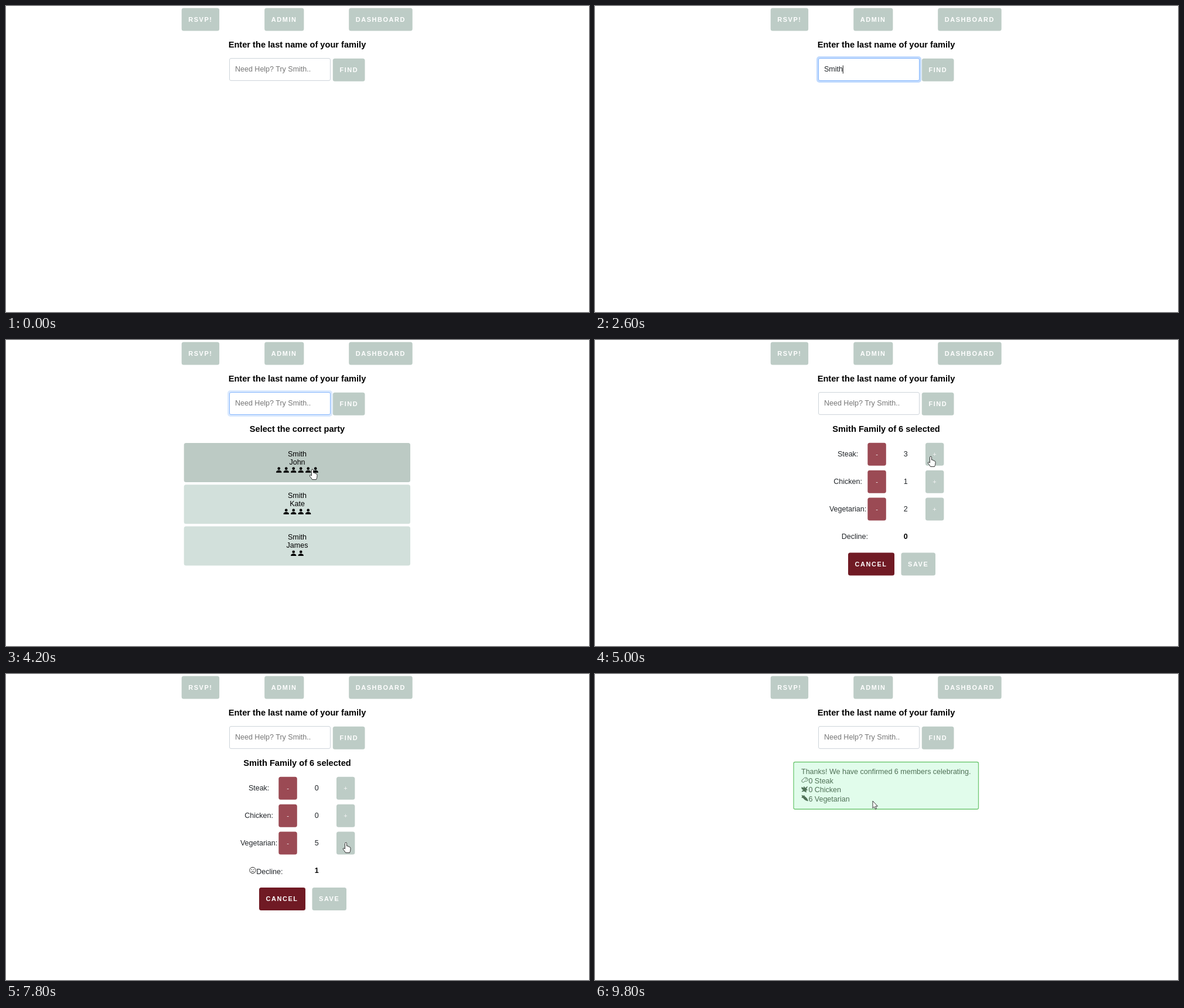
Write an HTML page that moves like this. It is 995x523 px and loops after 9.9 s.

```html
<!DOCTYPE html>
<html lang="en">
<head>
<meta charset="utf-8">
<title>RSVP form</title>
<style>
html, body { margin: 0; width: 100%; height: 100%; overflow: hidden; background: #fff; }
svg { display: block; width: 995px; height: 523px; }
text { font: 12.5px "Liberation Sans", Arial, sans-serif; fill: #212529; white-space: pre; }
.h { font-size: 14.625px; font-weight: 700; fill: #000; }
.b { font-size: 10.94px; font-weight: 700; letter-spacing: 1.56px; fill: #fff; }
.s { font-size: 10.94px; fill: #f4f4f4; }
.m { text-anchor: middle; }
.k { fill: #000; }
.n { font-weight: 700; fill: #000; }
.p { fill: #777; }
.g { fill: #4f7056; }
</style>
</head>
<body>
<svg id="stage" viewBox="0 0 995 523"></svg>
<script>
const LOOP = 9900, STEP = 100;
const SAGE = '#bdccc6', PALE = '#d2e0db', ROSE = '#9b4a54', WINE = '#701a24';
const stage = document.getElementById('stage');

// Pointer stops: time, x, y
const path = [
  [200, 549, 138], [300, 530, 112], [500, 515, 130],
  [4000, 556, 236], [4200, 523, 221], [4400, 523, 221], [5000, 573, 199],
  [5200, 579, 197], [5600, 483, 246], [5800, 482, 246], [6000, 467, 226],
  [6200, 483, 199], [6900, 483, 199], [7100, 589, 290], [7300, 580, 288],
  [8000, 580, 288], [8500, 549, 377], [9000, 549, 377], [9400, 246, 300], [9800, 474, 217]
];

const text = (s, x, y, cls = '') => `<text x="${x}" y="${y}" class="${cls}">${s}</text>`;
const box = (x, y, w, h, fill, r = 3.5, extra = '') =>
  `<rect x="${x}" y="${y}" width="${w}" height="${h}" rx="${r}" fill="${fill}" ${extra}/>`;
const button = (s, x, y, w, fill = SAGE) =>
  box(x, y, w, 39, fill) + text(s, x + 11.6, y + 23, 'b');
const shape = (d, x, y, fill, line = '#222', scale = 1) =>
  `<path d="${d}" transform="translate(${x} ${y}) scale(${scale})" fill="${fill}" stroke="${line}" stroke-width=".9" stroke-linejoin="round"/>`;

function pointer(t) {
  if (t < 200 || (t >= 700 && t < 4000)) return null;
  const i = path.findLastIndex(k => k[0] <= t), a = path[i], b = path[i + 1];
  if (!b || b[0] - a[0] > 3000) return { x: a[1], y: a[2] };
  const u = (t - a[0]) / (b[0] - a[0]), e = u * u * (3 - 2 * u);
  return { x: a[1] + (b[1] - a[1]) * e, y: a[2] + (b[2] - a[2]) * e };
}

const within = (p, x, y, w, h) => p && p.x >= x && p.x <= x + w && p.y >= y && p.y <= y + h;

function cursor(p, hand) {
  if (!p) return '';
  if (within(p, 381, 89, 173, 39))
    return shape('M-3-7H-1Q0-7 0-6Q0-7 1-7H3M0-6V6M-3 7H-1Q0 7 0 6Q0 7 1 7H3', p.x, p.y, 'none');
  if (hand)
    return shape('M-1.5 1.5Q-1.5 0 0 0Q1.5 0 1.5 1.5V6Q4 5.2 4.2 7Q6.2 6.5 6.4 8Q8 7.8 8 9.5V12Q8 14 6.5 17.5H-.5Q-1.5 15-4 12.5Q-5.5 10.5-4.2 9.8Q-3 9.4-1.5 11Z', p.x, p.y, '#fff');
  return shape('M0 0V12.3L2.7 9.8L4.5 14L6.5 13.1L4.7 9H8.4Z', p.x, p.y, '#fff');
}

function header(t) {
  const typed = t < 2200 || t >= 3100 ? '' : t < 2400 ? 'S' : t < 2600 ? 'Smi' : 'Smith';
  const caretX = { '': 391.5, S: 399.8, Smi: 413, Smith: 422.8 }[typed];
  const caretOn = (t >= 300 && t < 700) || (t >= 1200 && t < 1700) || (t >= 2200 && t < 3700);
  const glow = t >= 300 && t < 4200 ? 1 : t === 4200 ? .6 : 0;
  return button('RSVP!', 299.7, 3.5, 64.4) + button('ADMIN', 441.2, 3.5, 67.2) +
    button('DASHBOARD', 585.2, 3.5, 108.5) +
    text('Enter the last name of your family', 497, 70.7, 'h m') +
    box(378, 86, 179, 45, '#c2dbfe', 5, `opacity="${glow}"`) +
    box(381.5, 89.5, 172, 38, '#fff', 2.5, `stroke="${glow ? '#86b7fe' : '#ced4da'}"`) +
    (typed ? text(typed, 391, 112.2) : text('Need Help? Try Smith..', 391, 112.2, 'p')) +
    (caretOn ? box(caretX, 101.5, 1, 14, '#222', 0) : '') +
    button('FIND', 557.8, 89.8, 54.7);
}

function person(x, y) {
  return `<path transform="translate(${x} ${y}) scale(.78)" d="M3 14s-1 0-1-1 1-4 6-4 6 3 6 4-1 1-1 1H3zm5-6a3 3 0 100-6 3 3 0 000 6z"/>`;
}

function parties(p) {
  return text('Select the correct party', 497, 156.7, 'h m') +
    [['John', 6], ['Kate', 4], ['James', 2]].map(([name, size], i) => {
      const y = 176 + i * 71.2, on = within(p, 304, y, 386, 67);
      let s = box(303.7, y, 386.3, 67, on ? '#bccac4' : PALE) +
        text('Smith', 497, y + 22.5, 'm k') + text(name, 497, y + 36.7, 'm k');
      for (let j = 0; j < size; j++) s += person(497 + (j - size / 2) * 12.5, y + 39.8);
      return s;
    }).join('');
}

function frown(x, y) {
  return `<g fill="none" stroke="#333"><circle cx="${x}" cy="${y}" r="5.2"/>` +
    `<path d="M${x - 2.5} ${y + 2.9}q2.5-2.6 5 0M${x - 2.7} ${y - 1.2}h1.8m1.8 0h1.8"/></g>`;
}

function meals(t, p) {
  const clicks = (...at) => at.filter(x => x <= t).length;
  const counts = [3 - clicks(6200, 6400, 6700), 1 - clicks(5700), 2 + clicks(7200, 7500, 7700, 8000)];
  const out = 6 - counts[0] - counts[1] - counts[2];
  const y = out ? 365 : 363.5;
  let s = text('Smith Family of 6 selected', 497, 156.7, 'h m');
  ['Steak:', 'Chicken:', 'Vegetarian:'].forEach((name, i) => {
    const top = 175.8 + i * 46.9;
    s += text(name, 431.6, top + 23.6, 'm') + box(465.3, top, 31.5, 39, ROSE) +
      text('-', 479.3, top + 23.2, 's') + text(counts[i], 530.2, top + 23.6, 'm') +
      box(564, top, 31.4, 39, SAGE) + text('+', 576.2, top + 23.2, 's');
  });
  s += out ? frown(421, 335.5) + text('Decline:', 427.3, 341.5) : text('Decline:', 420.8, 340);
  return s + text(out, 530.2, 340, 'n m') + button('CANCEL', 432, y, 79, WINE) +
    button('SAVE', 522.5, y, 58.5, within(p, 522, y, 59, 39) ? PALE : SAGE);
}

function thanks() {
  const ink = '#4f7056';
  return box(339, 150.5, 315.5, 80.5, '#e1fceb', 2.5, 'stroke="#6fc873" stroke-width="1.3"') +
    text('Thanks! We have confirmed 6 members celebrating.', 352, 171.2, 'g') +
    ['Steak', 'Chicken', 'Vegetarian'].map((name, i) =>
      text((i === 2 ? 6 : 0) + ' ' + name, 364.4, 186.8 + i * 15.6, 'g')).join('') +
    shape('M1 8Q0 5 3 4Q5 0 9 1Q13 3 11 6Q9 8 6 7Q4 11 1 8ZM7 4Q9 2 10 4', 352, 176, 'none', ink) +
    shape('M1 2L4 4L5 1L7 4L11 1L9 5L11 7L8 8L9 11L5 9L1 10L4 7L1 5Z', 352, 191.5, ink, ink, .95) +
    shape('M1 1L4 2L5 1L6 3Q11 6 12 11Q6 10 3 5L1 5L2 3Z', 352, 206.5, ink, ink, .95);
}

function overButton(t, p) {
  if (t < 4300) return t >= 4000;
  if (t >= 8900) return false;
  return [0, 1, 2].some(i => [465, 564].some(x => within(p, x, 176 + i * 47, 32, 39))) ||
    within(p, 432, 364, 79, 40) || within(p, 522, 364, 59, 40);
}

function scene(t) {
  const p = pointer(t);
  const body = t < 3100 ? '' : t < 4300 ? parties(p) : t < 8900 ? meals(t, p) : thanks();
  return header(t) + body + cursor(p, overButton(t, p));
}

let last = -1;
function tick() {
  const t = Math.floor(performance.now() % LOOP / STEP) * STEP;
  if (t !== last) stage.innerHTML = scene(last = t);
  requestAnimationFrame(tick);
}
tick();
</script>
</body>
</html>
```
